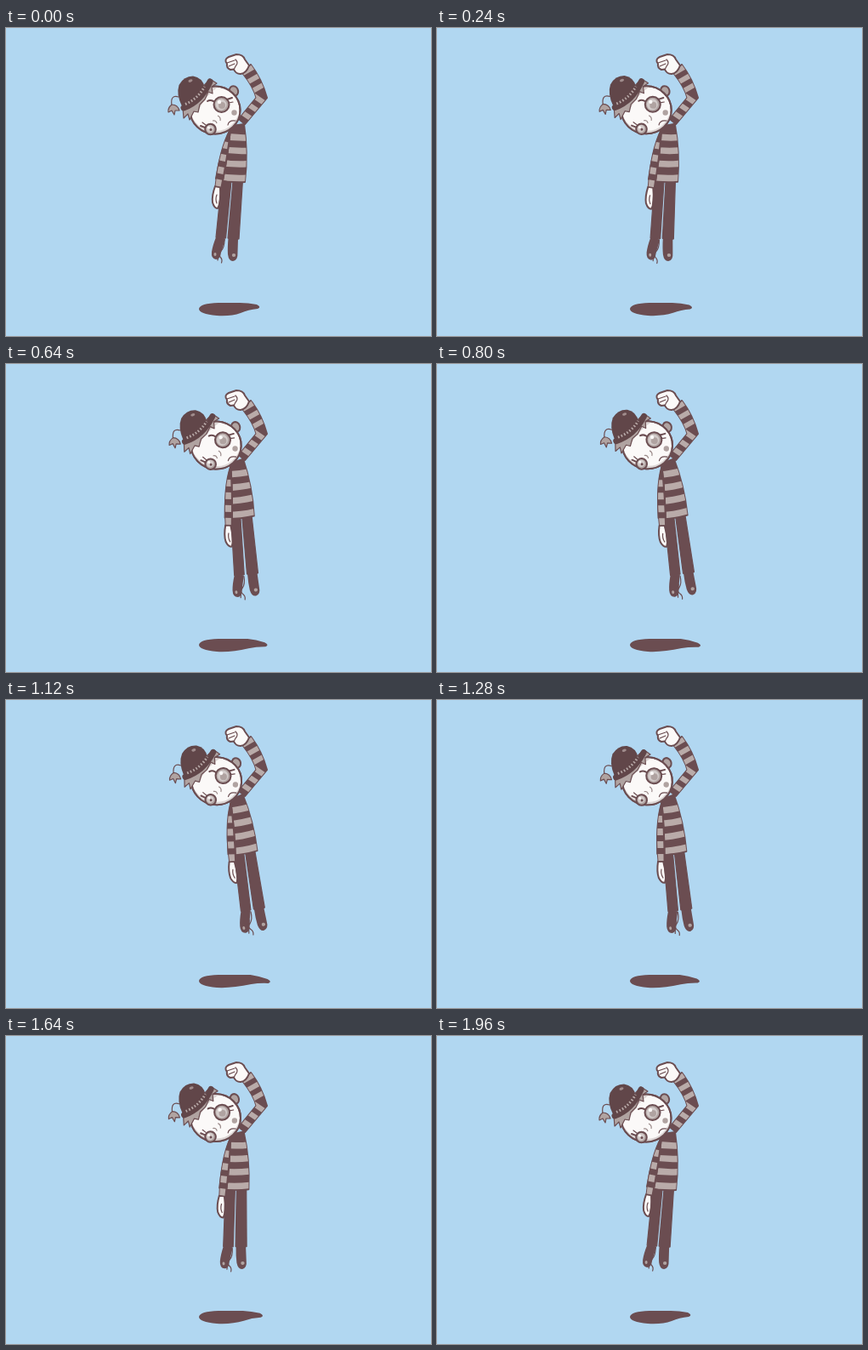
Write an HTML page that moves like this. It is 500x362 px and loops after 2000 ms.

```html
<!DOCTYPE html>
<html lang="en">
<head>
<meta charset="utf-8">
<title>Swinging figure</title>
<style>
  html, body { margin: 0; width: 100%; height: 100%; overflow: hidden; background: #b1d7f1; }
  svg { display: block; width: 100vw; height: 100vh; }
  .dark { fill: #6b4d51; }
  .hat { fill: #614649; }
  .grey { fill: #b0a3a1; }
  .skin { fill: #fbf9f8; }
  .shade { fill: #dcd6d5; }
  .ink { stroke: #6b4d51; stroke-width: 2; stroke-linejoin: round; stroke-linecap: round; }
  .thin { stroke-width: 1.2; }
  .line { fill: none; }
  .band { fill: none; stroke: #b9aba9; }
</style>
</head>
<body>
<svg viewBox="0 0 500 362">
  <defs>
    <path id="torso" d="M266 115 L280 113 Q285 146 281 181 Q263 182 247 177 Q253 141 266 115Z"/>
    <path id="sleeve" d="M264 119 Q261 150 253.500 187 L246.500 186 Q251 143 264 119Z"/>
    <path id="upperSleeve" d="M279 54 L288 43 Q301 60 307 82 L281 113 L274 107 L294.500 82 Q291 69 279 54Z"/>
    <path id="stripe" d="M-22 -2 Q0 3 22 1"/>
    <ellipse id="face" cx="246" cy="96.500" rx="29.500" ry="28"/>
    <clipPath id="torsoClip"><use href="#torso"/></clipPath>
    <clipPath id="sleeveClip"><use href="#sleeve"/></clipPath>
    <clipPath id="upperClip"><use href="#upperSleeve"/></clipPath>
    <clipPath id="faceClip"><use href="#face"/></clipPath>
  </defs>

  <path id="shadow" class="dark"/>

  <g id="body">
    <path class="skin ink" d="M246 186 Q242 197 243 205 Q245 212 249 212 Q253 206 252 187Z"/>
    <path class="line ink thin" d="M248 196 Q246 201 248 206"/>

    <g id="leftLeg">
      <path class="dark" d="M247 246 Q243 256 242 263 Q241 271 247 272 Q252 272 253 264 L258 248Z"/>
      <path class="dark ink thin" d="M254 178 L247 246 Q252 249 258.500 247 L265 180Z"/>
      <ellipse class="grey" cx="246" cy="266" rx="1.500" ry="2"/>
    </g>
    <path class="dark" d="M261.500 247 Q260.500 258 261 266 Q262 274 267 274 Q273 273 272.500 264 L273 248Z"/>
    <path class="dark ink thin" d="M267 180 L261 247 Q267 250 274 248 L278.500 178Z"/>
    <ellipse class="grey" cx="268" cy="267" rx="2.200" ry="2"/>
    <path class="line ink thin" d="M257 249 Q257 258 253 262 Q249 266 252 269 Q255 272 253.500 276 M253 258 Q250 266 249 273"/>

    <use href="#torso" class="dark ink"/>
    <g class="band" stroke-width="7.500" clip-path="url(#torsoClip)">
      <use href="#stripe" x="270" y="127.500"/>
      <use href="#stripe" x="268" y="143"/>
      <use href="#stripe" x="266" y="158.500"/>
      <use href="#stripe" x="265" y="175"/>
    </g>
    <use href="#sleeve" class="dark ink"/>
    <g clip-path="url(#sleeveClip)">
      <path class="band" stroke-width="14" stroke-dasharray="8 7" d="M260 134 L249 187"/>
    </g>
    <path class="line ink" d="M264 119 Q261 150 253.500 187"/>
  </g>

  <g id="arm">
    <use href="#upperSleeve" class="dark ink"/>
    <g class="band" stroke-width="22" stroke-dasharray="6 6" clip-path="url(#upperClip)">
      <path d="M283 47 L299 75"/>
      <path d="M298 80.500 L278 110"/>
    </g>
    <path class="skin ink" d="M262 34 L271 31 Q279 31 281 37 L286 44 Q283 53 276 54 Q270 54 268 48.500 L264 49 Q259 47 260 42 Q256 37 262 34Z"/>
    <path class="line ink thin" d="M260 41 L269 38 M262 45 L269 42 M270 37 Q274 41 270 45 L268 49"/>
  </g>

  <g id="head">
    <ellipse class="grey ink" cx="268" cy="74" rx="5" ry="6" transform="rotate(-25 268 74)"/>
    <use href="#face" class="skin ink"/>
    <g clip-path="url(#faceClip)">
      <path class="shade" d="M214 92 Q222 122 247 121 Q268 121 276 95 L278 128 L214 128Z"/>
      <path class="shade" d="M222 88 L243 70 L251 68 Q235 79 226 97Z"/>
    </g>
    <use href="#face" class="line ink"/>

    <circle class="grey ink" cx="253.500" cy="90" r="9"/>
    <circle fill="#d3cccb" cx="253" cy="90" r="6.500"/>
    <circle class="grey" cx="254" cy="91" r="4"/>
    <circle class="skin" cx="251" cy="87" r="2.200"/>
    <circle class="grey ink" cx="240.500" cy="119" r="6.300"/>
    <circle fill="#d3cccb" cx="240" cy="118.500" r="4.200"/>
    <circle class="dark" cx="241" cy="119.500" r="1.500"/>
    <circle class="skin" cx="238.500" cy="117" r="1.500"/>
    <path class="line ink" d="M260 84 L266 82 M244 86 Q240 84 237 86 M234 117 L229 115"/>
    <path class="line ink thin" d="M262 88 L267 87 M235 114 L231 111"/>
    <path class="line thin" stroke="#9b8b8a" d="M249 103 Q253 105 252 109 M243 109 Q247 108 248 112"/>
    <circle class="grey" cx="268.500" cy="99.500" r="3.200"/>
    <path class="line ink thin" d="M261 114 Q262 108 270 109"/>

    <path class="grey ink thin" d="M208 94 L209 106 L214 101 L216 108 L221 98 L226 99 L228 90 L234 84 L238 75 L243 77 L242 69 L248 65 L240 60Z"/>
    <path class="line ink thin" d="M203 81 Q193 78 195 91"/>
    <path class="grey ink thin" d="M195 90 Q190 94 191 99 L195 97 L198 102 L199 97 L204 97 Q202 90 195 90Z"/>
    <path class="hat" d="M207 92 Q200 78 203.500 67 Q209 56.500 220 56.500 Q231 58 234 70 L230 82Z"/>
    <path class="line" stroke="#614649" stroke-width="7" stroke-linecap="round" d="M209 94 Q230 86 240 63"/>
    <path class="line" stroke="#b9aba9" stroke-width="3" stroke-dasharray="1.600 2.200" d="M211 89.500 Q226 83 233.500 69"/>
    <ellipse fill="#a08c8c" cx="217" cy="62" rx="2.600" ry="1.600" transform="rotate(-20 217 62)"/>
  </g>
</svg>
<script>
  const LOOP = 2000, STEP = 40;
  const part = id => document.getElementById(id);
  const [shadow, body, leftLeg, head] = ["shadow", "body", "leftLeg", "head"].map(part);
  const turn = (el, angle, x, y) => el.setAttribute("transform", `rotate(${angle} ${x} ${y})`);

  // p runs from 0 (feet left) to 1 (feet right)
  function pose(p) {
    turn(body, -14 * p, 272, 118);
    turn(leftLeg, p, 262, 180);
    turn(head, 3.7 * p, 269, 122);
    const tip = 299 + 13 * p, drop = 3 * p;
    shadow.setAttribute("d",
      `M227 330 Q228 323.500 250 323 L${tip - 24} 323 Q${tip - 14} ${323 + drop / 2} ${tip - 4} ${325 + drop}` +
      ` Q${tip + 2} ${328 + drop} ${tip - 3} ${330 + drop}` +
      ` Q${tip - 14} ${331 + drop / 2} ${tip - 23} ${335 - drop / 3} Q265 339 248 338 Q227 336 227 330Z`);
  }

  function frame() {
    const t = Math.floor(performance.now() % LOOP / STEP) * STEP;
    pose((1 - Math.cos(2 * Math.PI * t / LOOP)) / 2);
    requestAnimationFrame(frame);
  }
  frame();
</script>
</body>
</html>
```
